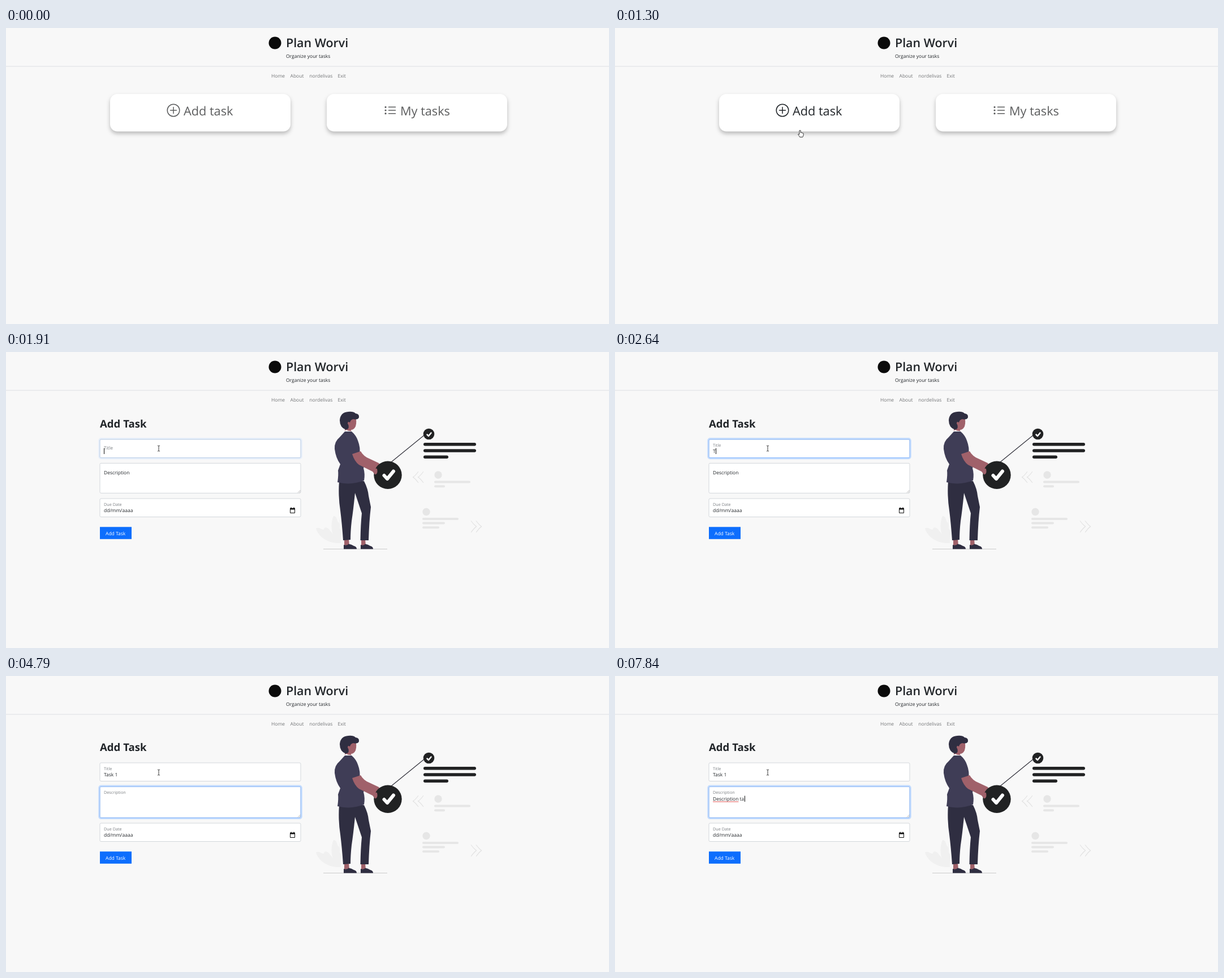
An HTML page for the animation above (8000 ms loop, 1066 px wide and 525 px high).

```html
<!DOCTYPE html>
<html lang="en">
<head>
<meta charset="utf-8">
<title>Add a task</title>
<style>
  html, body { margin: 0; width: 100%; height: 100%; overflow: hidden; background: #f8f8f8; }
  svg { display: block; width: 100vw; height: 100vh; }
  text { font: 8.5px "Open Sans", "Noto Sans", sans-serif; fill: #212529; white-space: pre; text-rendering: geometricPrecision; }
  .brand { font-size: 21.4px; font-weight: 600; }
  .nav text { fill: #747678; }
  .card rect { fill: #fff; filter: drop-shadow(0 4.5px 3.5px rgba(0, 0, 0, .25)); }
  .card text { font-size: 21.7px; fill: currentColor; }
  .card { color: #5c5d5e; }
  .card.hover { color: #212529; }
  .heading { font-size: 18.6px; font-weight: 700; }
  .small { font-size: 7.25px; fill: #7b7f83; }
  .box { fill: #fff; stroke: #d3d7db; }
  .ring { fill: none; stroke: #86b7fe; }
  .halo { fill: none; stroke: #c2dbfe; stroke-width: 2.2; }
  .skin { fill: #a0616a; }
  .dark { fill: #2f2e41; }
  .ink { fill: #212223; }
  .pale { fill: #e6e6e6; }
  .tick { fill: none; stroke: #fff; stroke-linecap: round; stroke-linejoin: round; }
  .cursor { fill: #fff; stroke: #222; stroke-width: .9; stroke-linejoin: round; }
</style>
</head>
<body>
<svg viewBox="0 0 1066 525">
  <circle cx="475.5" cy="26.5" r="11" fill="#0b0b0b"/>
  <text class="brand" x="495" y="34">Plan Worvi</text>
  <text x="495" y="53">Organize your tasks</text>
  <path d="M0 68H1066" stroke="#dcdfe2"/>
  <g class="nav">
    <text x="469" y="88">Home</text>
    <text x="502.5" y="88">About</text>
    <text x="536.3" y="88">nordelivas</text>
    <text x="586.5" y="88">Exit</text>
  </g>

  <g id="menu">
    <g class="card" id="addCard">
      <rect x="184" y="117" width="319" height="66.5" rx="13"/>
      <g fill="none" stroke="currentColor" stroke-width="1.5" stroke-linecap="round">
        <circle cx="296" cy="146" r="10.8"/>
        <path d="M290.5 146h11M296 140.5v11"/>
      </g>
      <text x="314" y="154.5">Add task</text>
    </g>
    <g class="card">
      <rect x="567" y="117" width="319" height="66.5" rx="13"/>
      <g stroke="currentColor" stroke-linecap="round">
        <path stroke-width="1.5" d="M676.5 140.3h12M676.5 146h12M676.5 151.7h12"/>
        <path stroke-width="3.2" d="M671 140.3h0M671 146h0M671 151.7h0"/>
      </g>
      <text x="697" y="154.5">My tasks</text>
    </g>
  </g>

  <g id="page">
    <g id="upper">
      <text class="heading" x="166" y="134">Add Task</text>
      <g id="titleField"></g>
    </g>
    <g id="noteField"></g>
    <g id="lower">
      <rect class="box" x="166" y="260" width="355" height="32.5" rx="2"/>
      <text class="small" x="173" y="272.7">Due Date</text>
      <text x="173" y="284">dd/mm/aaaa</text>
      <path d="M502.5 278.5h8v7h-8z" fill="none" stroke="#111"/>
      <path d="M502 276.7h9v2.8h-9zM503.5 275.5h1.2v2h-1.2zM508.3 275.5h1.2v2h-1.2z" fill="#111"/>
      <rect x="166" y="310.3" width="56" height="21.5" fill="#0d6efd"/>
      <text x="176" y="324.5" style="fill:#fff">Add Task</text>
    </g>

    <g id="art">
      <path d="M592 339C574 340 554 332 548 313C553 309 558 316 562 315C563 308 570 312 573 317C577 321 579 325 581 329C573 318 575 299 579 291C586 291 584 299 588 302C592 307 588 312 592 316Z" fill="#f0f0f0"/>
      <path d="M561 349.5H674" stroke="#cbcbcb"/>
      <path class="skin" d="M598 331h8l1 13h-9zM628 331h7l1 13h-8z"/>
      <path class="dark" d="M597 349.5V342Q602 344 606 340.5Q611 341 615 344Q620 345 620 349.5ZM627 349.5V342Q632 344 635 340.5Q640 341 644 344Q649 345 649 349.5Z"/>
      <path class="dark" d="M589 229H633Q640 243 641 255L645 275Q642 300 641 334L626.5 334Q627 305 629 286Q623 268 617 250Q614 280 611 300Q609 318 609 333L596 334Q594 305 591 281Q587 255 589 229Z"/>
      <path class="skin" d="M602 117L617 113Q621 122 618 132Q615 138 610 138L612 147H599V133Z"/>
      <path class="dark" d="M601 138Q590 134 590 121Q591 107 605 106Q614 105 618 109Q625 110 624 116Q622 121 614 119Q609 120 608 125Q604 122 604 127Q607 131 605 136Z"/>
      <path d="M598 141L601 138Q607 141 611 140L612 144Q605 147 598 141Z" fill="#fff"/>
      <path d="M599 141H611Q619 148 622 157Q627 170 625 181L621 185L631 194Q635 199 632 206Q635 216 633 228Q609 237 586 231Q588 218 587 210L591 199Q583 188 581 172Q580 159 590 151Z" fill="#3f3d56"/>
      <path class="skin" d="M612 181L627 176Q632 185 642 189L659 197Q664 203 657 208Q658 216 652 217L648 212L624 200Q616 194 612 181Z"/>
      <path d="M680 196L740 147" stroke="#2b2b35" stroke-width="1.1"/>
      <circle class="ink" cx="675" cy="218.3" r="24.7"/>
      <circle class="ink" cx="747.5" cy="145.5" r="9.8"/>
      <path class="tick" stroke-width="6" d="M668.5 219L674 225L685 211.5"/>
      <path class="tick" stroke-width="2.5" d="M744.5 146.5L747 149L751.5 143.5"/>
      <path class="skin" d="M650 206L656 207Q658 216 653 217.5Q649 215 650 206Z"/>
      <circle class="pale" cx="764" cy="218" r="6.7"/>
      <circle class="pale" cx="743" cy="283.5" r="6.7"/>
      <path d="M729 212Q724 219 719.5 222Q724 225 729 232M738 212Q733 219 728.5 222Q733 225 738 232M822 299.5Q827 306 831.5 309.5Q827 313 822 320M831 299.5Q836 306 840.5 309.5Q836 313 831 320" fill="none" stroke="#e2e2e2" stroke-width="1.2"/>
    </g>
  </g>

  <g id="arrow" class="cursor"><path d="M0 0V10.5L2.5 8.2L4.2 12L6 11.2L4.4 7.5H7.6Z"/></g>
  <g id="hand" class="cursor"><path d="M-1 1Q0-.7 1.2 1V4.5Q2.3 4 3 5Q4.3 4.5 4.8 5.5Q6.2 5.3 6.2 7Q6.2 10 4.8 12.5H-.3Q-1.5 10-3.3 8Q-3.3 6.2-1 7.6Z"/></g>
  <g id="beam"><path d="M-2-5Q-.5-5 0-4Q.5-5 2-5M0-4V4M-2 5Q-.5 5 0 4Q.5 5 2 5" fill="none" stroke="#222" stroke-width=".9"/></g>
</svg>
<script>
const LOOP = 8000, PAGE_AT = 1370, TITLE_FOCUS = 1850, NOTE_FOCUS = 4250;
const $ = id => document.getElementById(id);

function add(parent, tag, attrs) {
  const node = document.createElementNS('http://www.w3.org/2000/svg', tag);
  for (const key in attrs) node.setAttribute(key, attrs[key]);
  return parent.appendChild(node);
}

// Bars of the illustration: x, y, width, height, class
[[738, 161, 93, 5.5, 'ink'], [738, 172.3, 93, 5.5, 'ink'], [738, 183.5, 44, 5.5, 'ink'],
 [757, 228.5, 64, 4, 'pale'], [757, 236.3, 19, 4, 'pale'],
 [736, 294, 64, 4, 'pale'], [736, 301.6, 40, 4, 'pale'], [736, 309.2, 30, 4, 'pale']]
  .forEach(([x, y, width, height, cls]) =>
    add($('art'), 'rect', { x, y, width, height, rx: height / 2, class: cls }));

function makeField(group, y, height, name, baseline) {
  const frame = { x: 166, y, width: 355, height, rx: 2 };
  const rects = [add(group, 'rect', { ...frame, class: 'box' })];
  const glow = add(group, 'g', {});
  const halo = add(glow, 'rect', { x: 164.4, y: y - 1.6, width: 358.2, height: height + 3.2, rx: 3.5, class: 'halo' });
  rects.push(add(glow, 'rect', { ...frame, class: 'ring' }));
  const label = add(group, 'text', { x: 173, y: baseline });
  label.textContent = name;
  const typed = add(group, 'text', { x: 173, y: baseline + 4.2 });
  const underline = add(group, 'rect', { x: 173, y: baseline + 5.5, height: 1, fill: '#e2504f' });
  const caret = add(group, 'rect', { y: baseline - 4.5, width: 1, height: 10.5, fill: '#111' });

  return {
    float(p, rise) {
      label.setAttribute('y', baseline - rise * p);
      label.style.fontSize = 8.5 - 1.25 * p + 'px';
      label.style.fill = p ? '#7b7f83' : '#212529';
    },
    focus(p) { glow.style.opacity = p; },
    type(text, active, blinkOn) {
      typed.textContent = text;
      const space = text.indexOf(' ');
      underline.setAttribute('width', active && space > 0 ? typed.getSubStringLength(0, space) : 0);
      caret.setAttribute('x', Math.ceil(173 + (text ? typed.getComputedTextLength() : 0)));
      caret.style.display = active && blinkOn ? '' : 'none';
    },
    grow(d) {
      rects.forEach(r => { r.setAttribute('y', y - d); r.setAttribute('height', height + 2 * d); });
      halo.setAttribute('y', y - d - 1.6);
      halo.setAttribute('height', height + 2 * d + 3.2);
    }
  };
}

const title = makeField($('titleField'), 155, 32.5, 'Title', 175);
const note = makeField($('noteField'), 197.3, 53, 'Description', 217);
add($('noteField'), 'path', { id: 'grip', d: 'M516 249.5l4.5-4.5M518.5 249.5l2-2', stroke: '#8a8a8a', 'stroke-width': .6 });

const titleKeys = [[0, ''], [2180, 'TA'], [2640, 'T'], [2770, 'Ta'], [2970, 'Tas'],
  [3110, 'Task'], [3240, 'Task '], [3980, 'Task 1']];
const noteTimes = [5120, 5320, 5450, 5650, 6440, 6570, 6770, 6870, 6970, 7110, 7240, 7440, 7640, 7840];
const noteText = 'Description ta';
const caretOff = [[3780, 3980], [4790, 5120], [6170, 6440]];
const path = [[400, 897, 236], [700, 690, 222], [950, 410, 194], [1160, 327, 181],
  [1300, 327, 181], [1370, 307, 171], [1710, 270, 171]];

const fadeIn = (t, start) => t < start ? 0 : t < start + 70 ? 1 / 3 : t < start + 130 ? 2 / 3 : 1;
const show = (id, on) => { $(id).style.display = on ? '' : 'none'; };
const shift = (id, x, y) => $(id).setAttribute('transform', `translate(${x} ${y})`);

function pointer(t) {
  const from = t < PAGE_AT ? 400 : PAGE_AT;
  const held = from + Math.floor((t - from) / 69) * 69;
  const next = path.findIndex(k => k[0] > held);
  if (next < 0) return path[path.length - 1].slice(1);
  if (next === 0) return path[0].slice(1);
  const [t0, x0, y0] = path[next - 1], [t1, x1, y1] = path[next];
  const p = (held - t0) / (t1 - t0);
  return [x0 + (x1 - x0) * p, y0 + (y1 - y0) * p];
}

function draw(t) {
  const onPage = t >= PAGE_AT, inNote = t >= NOTE_FOCUS;
  const [x, y] = pointer(t);
  const hover = t >= 400 && x < 503 && y < 188;
  show('menu', !onPage);
  show('page', onPage);
  $('addCard').classList.toggle('hover', hover);
  show('arrow', t >= 400 && !onPage && !hover);
  show('hand', !onPage && hover);
  show('beam', onPage);
  ['arrow', 'hand', 'beam'].forEach(id => shift(id, x, y));

  const titleIn = fadeIn(t, TITLE_FOCUS), noteIn = fadeIn(t, NOTE_FOCUS);
  const blinkOn = !caretOff.some(([from, to]) => t >= from && t < to);
  title.float(titleIn, 7);
  title.focus(titleIn * (1 - noteIn));
  title.type(titleKeys.filter(k => k[0] <= t).pop()[1], t >= TITLE_FOCUS && !inNote, blinkOn);
  note.float(noteIn, 8);
  note.focus(noteIn);
  note.type(noteText.slice(0, noteTimes.filter(k => k <= t).length), inNote, blinkOn);

  const d = inNote ? 1 : 0;
  note.grow(d);
  shift('upper', 0, -d);
  shift('lower', 0, d);
  shift('grip', 0, d);
}

const start = performance.now();
function tick() {
  draw((performance.now() - start) % LOOP);
  requestAnimationFrame(tick);
}
tick();
</script>
</body>
</html>
```
